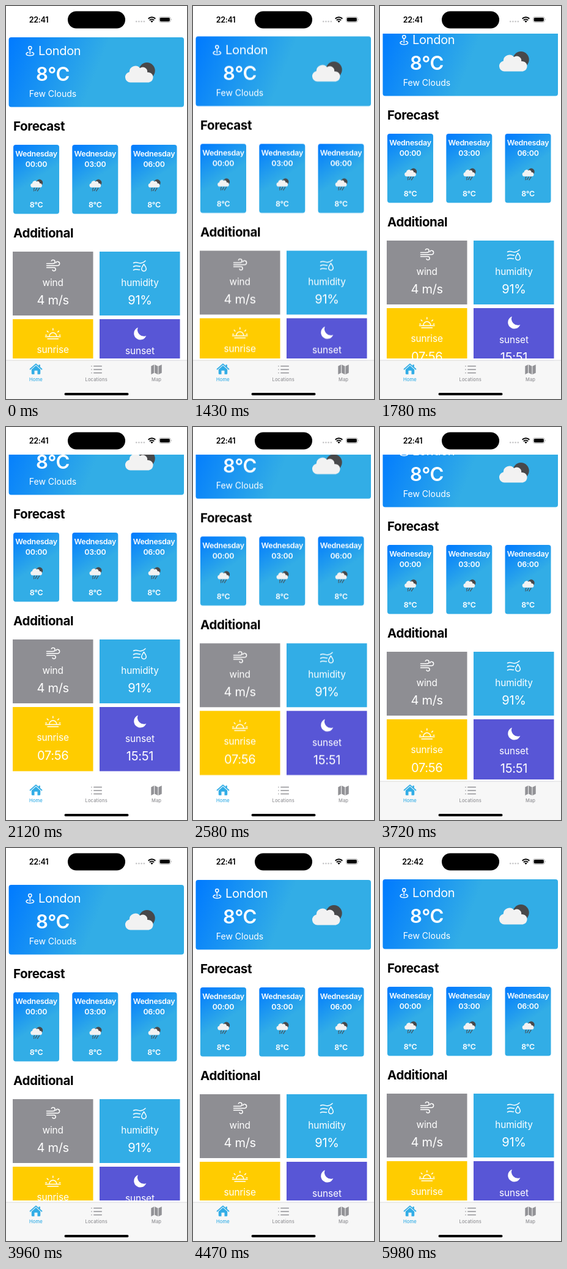
These frames come from a looping animation (296 by 640 pixels, 6640 ms). An HTML page:

```html
<!DOCTYPE html>
<html lang="en">
<head>
<meta charset="utf-8">
<title>Weather</title>
<style>
html, body { margin: 0; width: 100%; height: 100%; overflow: hidden; background: #fff; }
svg { display: block; width: 296px; height: 640px; }
text { font-family: Inter, Roboto, sans-serif; text-anchor: middle; }
.white { fill: #fff; }
.left { text-anchor: start; }
.clock { font-size: 12.6px; font-weight: 600; letter-spacing: -.3px; }
.head { font-size: 20.5px; font-weight: 700; letter-spacing: -.4px; }
.small { font-size: 12.4px; font-weight: 600; letter-spacing: -.25px; }
.label { font-size: 15.4px; letter-spacing: -.1px; }
.value { font-size: 20px; letter-spacing: -.3px; }
.tab { font-size: 7.5px; font-weight: 500; letter-spacing: .15px; }
.line { fill: none; stroke: #fff; stroke-width: 1.5; stroke-linecap: round; stroke-linejoin: round; }

.content, .bar, .early, .late { animation: 6640ms step-end infinite; }
.content { animation-name: scroll; }
.bar { animation-name: bar; }
.early { animation-name: early; }
.late { animation-name: late; }

/* drag up past the end, spring back, then drag down past the top */
@keyframes scroll {
  0% { transform: translateY(0); }
  21.536% { transform: translateY(-1.5px); }
  23.343% { transform: translateY(-7px); }
  25.151% { transform: translateY(-18px); }
  26.958% { transform: translateY(-32px); }
  28.765% { transform: translateY(-45px); }
  30.12% { transform: translateY(-51px); }
  31.928% { transform: translateY(-54px); }
  33.735% { transform: translateY(-51.5px); }
  35.542% { transform: translateY(-49px); }
  37.349% { transform: translateY(-47.7px); }
  39.157% { transform: translateY(-47px); }
  40.512% { transform: translateY(-46.5px); }
  52.56% { transform: translateY(-45.5px); }
  54.367% { transform: translateY(-34px); }
  56.175% { transform: translateY(-13px); }
  57.982% { transform: translateY(4px); }
  59.639% { transform: translateY(9px); }
  61.898% { transform: translateY(5px); }
  63.554% { transform: translateY(3px); }
  65.211% { transform: translateY(1.8px); }
  67.319% { transform: translateY(1px); }
  90.06%, 100% { transform: translateY(0); }
}
@keyframes bar {
  0% { opacity: 1; }
  28.765% { opacity: 0; }
  54.367%, 100% { opacity: 1; }
}
@keyframes early { 0% { opacity: 1; } 90.06%, 100% { opacity: 0; } }
@keyframes late { 0% { opacity: 0; } 90.06%, 100% { opacity: 1; } }
</style>
</head>
<body>
<svg viewBox="0 0 296 640">
  <defs>
    <linearGradient id="wide" gradientUnits="userSpaceOnUse" x1="4.5" y1="51" x2="147.8" y2="107.8">
      <stop stop-color="#007aff"/><stop offset="1" stop-color="#32ade6"/>
    </linearGradient>
    <linearGradient id="tall" gradientUnits="userSpaceOnUse" x1="0" y1="0" x2="37.5" y2="56.3">
      <stop stop-color="#007aff"/><stop offset="1" stop-color="#32ade6"/>
    </linearGradient>
    <clipPath id="view"><rect y="45" width="296" height="528.5"/></clipPath>
    <g id="cloud">
      <circle cx="36" cy="13.3" r="13.2" fill="#48484a"/>
      <path fill="#f2f2f2" d="M9 32.5a8.6 8.6 0 0 1-1.8-17A10 10 0 0 1 24.6 9 7.6 7.6 0 0 1 36.6 16a8.3 8.3 0 0 1 2.4 16.5z"/>
    </g>
    <g id="card">
      <rect width="75" height="112.5" rx="4" fill="url(#tall)"/>
      <use href="#cloud" transform="translate(28 56.3) scale(.41)"/>
      <path d="M34.5 70.5l-1.2 2M38.5 70.5l-2.4 4.2M42.5 70.5l-1.2 2M34 74l-.6 1M40.5 73.5l-1 1.8" stroke="#48484a" stroke-width="1.2" stroke-linecap="round"/>
      <g class="white small">
        <text x="37.5" y="19.2">Wednesday</text>
        <text x="37.5" y="102">8°C</text>
      </g>
    </g>
    <path id="gust" d="M0 6h10.5a3 3 0 1 0-2.7-4.2M0 9.3h18a3.2 3.2 0 1 0-3-4.5M0 12.6h12a2.7 2.7 0 1 1-2.5 3.8"/>
  </defs>

  <rect width="296" height="640" fill="#fff"/>

  <g clip-path="url(#view)">
    <g class="content">
      <rect x="4.5" y="51" width="286.5" height="113.5" rx="4" fill="url(#wide)"/>
      <g class="line" stroke-width="1.3">
        <circle cx="39.3" cy="68.3" r="2.6"/>
        <path d="M39.3 71v7M36.3 75.6c-5 1-4.4 5.2 3 5.2s8-4.2 3-5.2"/>
      </g>
      <g class="white">
        <text class="left" x="53" y="80.3" font-size="20" letter-spacing="-.3">London</text>
        <text x="76.5" y="122" font-size="31" font-weight="600" letter-spacing="-.3">8°C</text>
        <text x="76.5" y="148" font-size="14">Few Clouds</text>
      </g>
      <use href="#cloud" x="194.5" y="92"/>

      <text class="left head" x="12" y="202.5">Forecast</text>
      <use href="#card" x="12" y="226"/>
      <use href="#card" x="108.3" y="226"/>
      <use href="#card" x="204.5" y="226"/>
      <g class="white small">
        <text x="49.5" y="262">00:00</text>
        <text x="145.8" y="262">03:00</text>
        <text x="242" y="262">06:00</text>
      </g>

      <text class="left head" x="12" y="376.5">Additional</text>
      <rect x="11" y="400" width="131.5" height="104" fill="#8e8e93"/>
      <rect x="153" y="400" width="131.5" height="104" fill="#32ade6"/>
      <rect x="11" y="510" width="131.5" height="104.5" fill="#fc0"/>
      <rect x="153" y="510" width="131.5" height="104.5" fill="#5856d6"/>

      <g class="line">
        <use href="#gust" x="66.5" y="413.5"/>
        <path d="M208.5 418.5c6-3 8 1.5 13 0q4-1 6.500-3.500M208.500 424.500c5-3 7 0 11-.5M208.500 430c4-2.500 7 0 10-.5"/>
        <path d="M225.500 420.500c2 3 3.800 5 3.800 7.500a3.800 3.800 0 0 1-7.600 0c0-2.500 1.800-4.500 3.800-7.500z"/>
        <path d="M64.500 538.500h24.500M68 542h17.500M70.800 538a6 6 0 1 1 12 0M76.800 525.300v2.400M67.200 529.200l1.700 1.700M86.400 529.200l-1.700 1.700M64.800 536h1.500M87.300 536h1.500"/>
      </g>
      <path class="white" d="M215.800 523.500a10.400 10.400 0 1 0 13.500 13.500a10.400 10.400 0 0 1-13.500-13.500z"/>

      <g class="white label">
        <text x="76.700" y="455.500">wind</text>
        <text x="219" y="456">humidity</text>
        <text x="76.700" y="565">sunrise</text>
        <text x="219" y="566.500">sunset</text>
      </g>
      <g class="white value">
        <text x="76.700" y="486">4 m/s</text>
        <text x="219" y="486.300">91%</text>
        <text x="76.700" y="595.800">07:56</text>
        <text x="219" y="597">15:51</text>
      </g>
    </g>
  </g>

  <text class="clock early" x="53.500" y="26.500">22:41</text>
  <text class="clock late" x="53.500" y="26.500">22:42</text>
  <rect x="101" y="8.500" width="94" height="28" rx="14"/>
  <path d="M213.200 25.300h14" stroke="#c4c4c6" stroke-width="2.600" stroke-linecap="round" stroke-dasharray="0 4.200"/>
  <g fill="none" stroke="#000" stroke-width="2">
    <path d="M232.700 20.700a8.300 8.300 0 0 1 11.600 0M234.900 23.200a5.200 5.200 0 0 1 7.200 0"/>
  </g>
  <path d="M238.500 27l-2.100-2.200a3 3 0 0 1 4.200 0z"/>
  <rect x="250.500" y="17.700" width="18.500" height="8.800" rx="2.800" fill="none" stroke="#a0a0a0" stroke-width=".8"/>
  <rect x="251.700" y="18.900" width="16.100" height="6.400" rx="1.700"/>
  <path d="M270.100 20.600q1.600 1.500 0 3z" fill="#a0a0a0"/>

  <g class="bar">
    <rect y="577" width="296" height="63" fill="#f7f7f7"/>
    <rect y="576.700" width="296" height=".6" fill="#c4c4c6"/>
  </g>
  <g fill="#32ade6">
    <path d="M39.500 591.500l9.500-8.300 9.500 8.300" fill="none" stroke="#32ade6" stroke-width="1.700" stroke-linecap="round" stroke-linejoin="round"/>
    <path d="M53.500 584h2.300v5l-2.300-2zM49 585.600l7.200 6.300v6.600q0 1.300-1.300 1.300H51.500v-6h-5v6h-3.400q-1.300 0-1.300-1.300v-6.600z"/>
    <text class="tab" x="49" y="611.300">Home</text>
  </g>
  <g fill="#929296">
    <path d="M143.800 586.500h12.500M143.800 592h12.500M143.800 597.500h12.500M139.900 586.500h.1M139.900 592h.1M139.900 597.500h.1" stroke="#929296" stroke-width="1.500" stroke-linecap="round"/>
    <text class="tab" x="147.700" y="611.300">Locations</text>
    <path d="M237.300 586.600l4.800-2.500v13.300l-4.800 2.500zM243.100 584.100l5.300 2.500v13.300l-5.300-2.500zM249.400 586.600l5.300-2.500v13.300l-5.300 2.500z"/>
    <text class="tab" x="246" y="611.300">Map</text>
  </g>
  <rect x="95.500" y="630" width="105" height="4" rx="2"/>
</svg>
</body>
</html>
```
